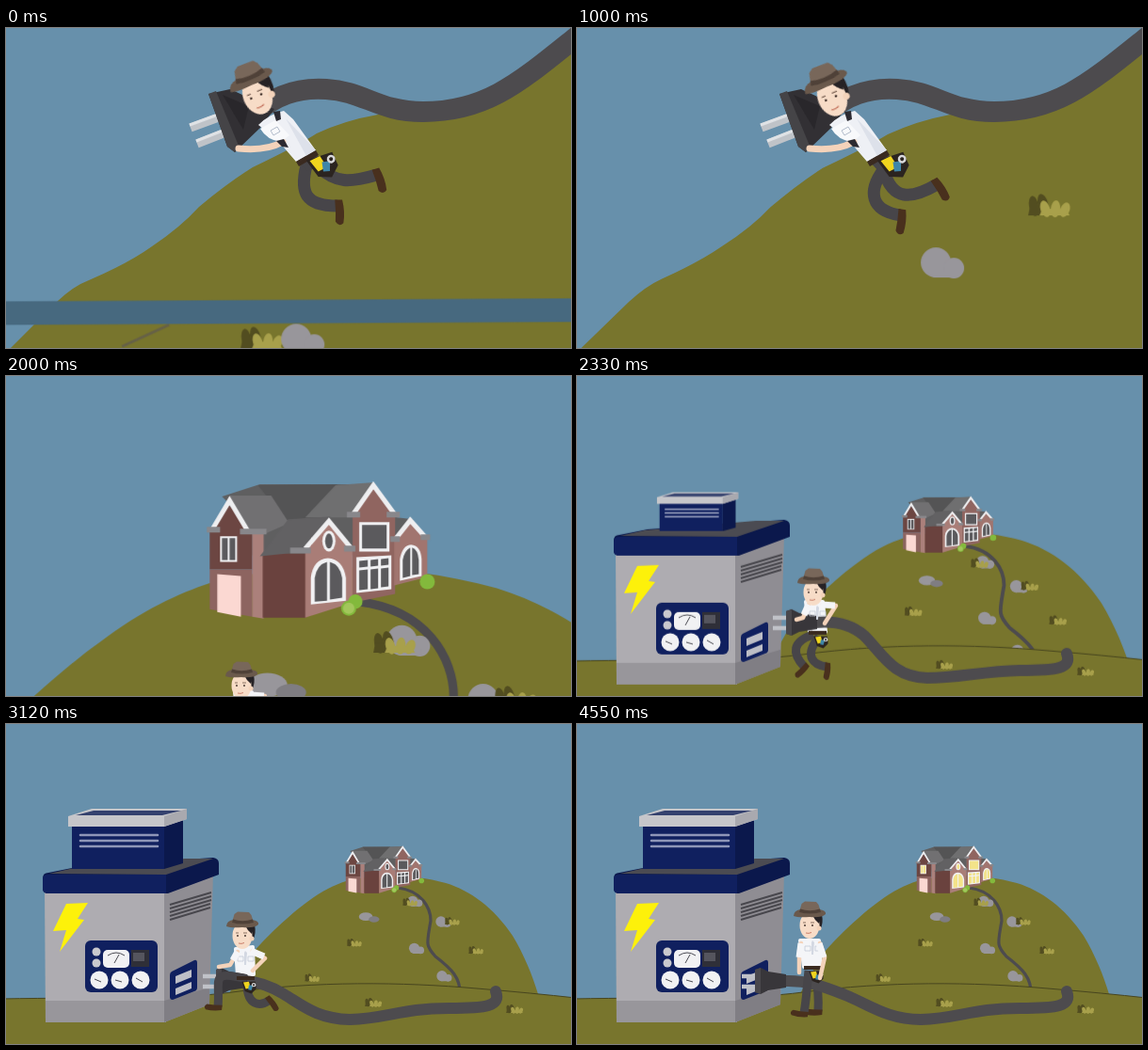
An HTML page for the animation above (4580 ms loop, 600 by 340 pixels).

```html
<!DOCTYPE html>
<html lang="en">
<head>
<meta charset="utf-8">
<title>Plugging in the house</title>
<style>
html, body { margin: 0; width: 100%; height: 100%; overflow: hidden; background: #6790ab; }
svg { display: block; width: 100vw; height: 100vh; }
svg * { animation: 4580ms linear infinite; }

/* scene switch */
.slope { animation-name: slope; animation-timing-function: step-end; }
.yard { animation-name: yard; animation-timing-function: step-end; }
@keyframes slope { 0% { visibility: visible } 38.43%, 100% { visibility: hidden } }
@keyframes yard { 0% { visibility: hidden } 38.43%, 100% { visibility: visible } }

/* running downhill */
.scroll { animation-name: scroll; }
@keyframes scroll { 0% { transform: none } 38.43%, 100% { transform: translate(2112px, -1162px) } }
.edge { animation-name: edge; }
@keyframes edge {
  0%, 21% { d: path("M5 340L55 290Q72 274 88 268Q130 250 155 232Q185 212 205 190Q235 165 262 148Q310 125 330 112Q360 98 395 92Q450 88 500 74Q545 58 610 10V340Z") }
  12.66% { d: path("M0 340L40 305Q65 282 90 267Q140 238 165 224Q195 208 210 193Q235 170 250 157Q290 138 325 120Q365 101 395 92Q450 88 500 74Q545 58 610 10V340Z") }
  31%, 100% { d: path("M0 340L55 302Q88 275 108 253Q130 235 150 227Q190 212 208 197Q232 172 250 157Q290 141 330 124Q365 108 395 95Q470 74 505 57Q530 43 610 8V340Z") }
}
.bob { animation-name: bob; }
@keyframes bob {
  0%, 9.5%, 15.72%, 24.89%, 34.17% { transform: translate(-2px, -3px) }
  3.17%, 12.66%, 18.78%, 27.95%, 37.34% { transform: none }
  6.33%, 21.83%, 31% { transform: translate(2px, -1px) }
}
.near { animation-name: near; }
@keyframes near {
  0%, 9.5%, 15.72%, 24.89%, 34.17% { d: path("M319 146C312 175 318 189 352 189") }
  3.17%, 12.66%, 18.78%, 27.95%, 37.34% { d: path("M322 146C290 155 282 180 330 183") }
  6.33%, 21.83%, 31% { d: path("M326 150C308 174 312 194 343 199") }
}
.far { animation-name: far; }
@keyframes far {
  0%, 9.5%, 15.72%, 24.89%, 34.17% { d: path("M333 148C350 165 365 164 393 156") }
  3.17%, 12.66%, 18.78%, 27.95%, 37.34% { d: path("M332 148C345 182 355 182 386 181") }
  6.33%, 21.83%, 31% { d: path("M326 152C335 184 355 182 381 167") }
}

/* camera pulls back */
.zoom { animation-name: zoom; }
.front { animation-name: front; }
@keyframes zoom {
  0%, 39.61% { transform: translate(326px, 188px) scale(3.03); animation-timing-function: cubic-bezier(.65, 0, .35, 1) }
  55.26%, 100% { transform: translate(401px, 155px) scale(1) }
}
@keyframes front {
  0%, 39.61% { transform: translate(0, 116px); animation-timing-function: cubic-bezier(.65, 0, .35, 1) }
  55.26%, 100% { transform: translate(0, 0) }
}
.gen { animation-name: gen; }
@keyframes gen {
  0%, 44.3% { transform: translate(0, 230px); animation-timing-function: ease-out }
  50%, 100% { transform: translate(0, 0) }
}
.top { transform-origin: 126px 154px; animation-name: top; }
@keyframes top {
  0%, 48% { transform: scale(.3, .1) }
  50.87% { transform: scale(.68, .64) }
  53% { transform: scale(1.06, 1.08) }
  54.6%, 100% { transform: scale(1) }
}
.lit { fill: #5b5a5d; animation-name: lit; animation-timing-function: step-end; }
@keyframes lit { 0% { fill: #5b5a5d } 85.2%, 100% { fill: #f3e389 } }

/* plugging in */
.plug { animation-name: plug; }
@keyframes plug {
  0%, 52% { transform: translate(222px, 251px) }
  62%, 72% { transform: translate(223px, 273px) }
  79%, 100% { transform: translate(189px, 273px) }
}
.cable { animation-name: cable; }
@keyframes cable {
  0%, 52% { d: path("M254 251C275 249 292 254 305 265C325 285 335 309 372 310C405 310 430 303 470 302C510 302 526 300 520 284") }
  62%, 72% { d: path("M254 273C270 274 282 279 295 287C315 299 330 313 365 314C405 313 420 302 470 302C510 302 526 300 520 284") }
  79%, 100% { d: path("M220 273C245 272 262 279 285 288C310 298 330 314 365 314C405 313 420 302 470 302C510 302 526 300 520 284") }
}
.face { animation-name: face; }
@keyframes face {
  0%, 43.67%, 47.27% { transform: translate(250px, 222px) }
  50.87%, 55% { transform: translate(251px, 219px) }
  62%, 72% { transform: translate(251px, 225px) }
  84%, 100% { transform: translate(247px, 214px) }
}
.shirt { animation-name: shirt; }
@keyframes shirt {
  0%, 55% { d: path("M243 229L261 229L264 261L247 261Z") }
  62%, 72% { d: path("M244 239L262 237L263 266L246 267Z") }
  84%, 100% { d: path("M237 230L257 230L259 258L241 258Z") }
}
.tools { animation-name: tools; }
@keyframes tools {
  0%, 55% { transform: translate(257px, 268px) }
  62%, 72% { transform: translate(256px, 276px) }
  84%, 100% { transform: translate(252px, 265px) }
}
.arm1 { animation-name: arm1; }
@keyframes arm1 {
  0%, 55% { d: path("M261 232L275 233L263 252") }
  62%, 72% { d: path("M262 241L275 249L262 262") }
  84%, 100% { d: path("M258 233L263 248L258 270") }
}
.sleeve1 { animation-name: sleeve1; }
@keyframes sleeve1 {
  0%, 55% { d: path("M259 232L274 233") }
  62%, 72% { d: path("M260 241L274 247") }
  84%, 100% { d: path("M257 233L262 248") }
}
.arm2 { animation-name: arm2; }
@keyframes arm2 {
  0%, 55% { d: path("M246 232L240 246L233 248") }
  62%, 72% { d: path("M246 242L238 256L226 258") }
  84%, 100% { d: path("M238 233L236 248L236 264") }
}
.sleeve2 { animation-name: sleeve2; }
@keyframes sleeve2 {
  0%, 55% { d: path("M246 232L241 243") }
  62%, 72% { d: path("M246 242L241 251") }
  84%, 100% { d: path("M238 233L236 248") }
}
.leg1 { animation-name: leg1; }
@keyframes leg1 {
  0%, 39.6%, 47.27%, 54% { d: path("M251 264C250 284 256 292 264 296") }
  43.67%, 50.87%, 57% { d: path("M251 264C228 271 228 284 241 298") }
  62%, 72% { d: path("M256 271C215 261 228 272 225 300") }
  77% { d: path("M254 268C205 258 212 275 214 296") }
  84%, 100% { d: path("M246 262C244 280 244 290 241 307") }
}
.leg2 { animation-name: leg2; }
@keyframes leg2 {
  0%, 39.6%, 47.27%, 54% { d: path("M256 266C236 270 232 286 240 300") }
  43.67%, 50.87%, 57% { d: path("M257 266C240 288 252 296 265 298") }
  62%, 72% { d: path("M256 276C256 300 270 300 279 294") }
  84%, 100% { d: path("M253 262C256 280 257 290 256 305") }
}

.pants { fill: none; stroke: #474549; stroke-width: 13; marker-end: url(#shoe); }
.small .pants { stroke-width: 9; }
.skin { fill: none; stroke: #f4d3ba; stroke-linecap: round; stroke-linejoin: round; }
.cord { fill: none; stroke: #4d4b4e; stroke-linecap: round; }
.trim { fill: none; stroke: #eeeef0; }
.white { fill: #f1f1f3; }
.navy { fill: #10205f; }
.grey { fill: #98969b; }
</style>
</head>
<body>
<svg viewBox="0 0 600 340" preserveAspectRatio="none">
<defs>
  <marker id="shoe" orient="auto" overflow="visible" markerWidth="1" markerHeight="1">
    <path d="M-.2-.5H.4Q.65.5.5 1.4Q.15 1.75-.15 1.3Q-.1.5-.2-.5Z" fill="#49301d"/>
  </marker>
  <g id="bush">
    <g fill="#524d20">
      <ellipse cx="-16" cy="-10" rx="5" ry="11" transform="rotate(-10 -16 -10)"/>
      <ellipse cx="-6" cy="-11" rx="5.5" ry="12" transform="rotate(-14 -6 -11)"/>
      <path d="M-22 0L-20-10H-4V0Z"/>
    </g>
    <g fill="#a8a04b">
      <ellipse cx="-4" cy="-7" rx="5" ry="9" transform="rotate(-16 -4 -7)"/>
      <ellipse cx="7" cy="-7" rx="5" ry="9" transform="rotate(6 7 -7)"/>
      <ellipse cx="17" cy="-6" rx="5" ry="8" transform="rotate(22 17 -6)"/>
      <path d="M-10 0L-7-7H18L22 0Z"/>
    </g>
  </g>
  <g id="rock" class="grey">
    <circle r="16"/><circle cx="19" cy="6" r="11"/><path d="M-10 10H20V16H-2Z"/>
  </g>
  <g id="stones">
    <ellipse rx="21" ry="12.5" fill="#98969b"/><ellipse cx="25" cy="8" rx="16" ry="9" fill="#7f7d82"/>
  </g>
  <g id="head">
    <path d="M-2-12H13Q15-2 11 5L5 3Z" fill="#262225"/>
    <ellipse rx="10.5" ry="14" fill="#f7dcc7"/>
    <circle cx="10" cy="3" r="2.5" fill="#f4d3ba"/>
    <path d="M-4-12H12L10-2Q5-6 3-11Z" fill="#262225"/>
    <g fill="#3b2b25"><circle cx="-5" r=".9"/><circle cx="3" r=".9"/></g>
    <path d="M-7-3h3M1-3h4" stroke="#5a4034" stroke-width=".7"/>
    <path d="M-4 8Q-1 9 2 7.5" fill="none" stroke="#c5745f" stroke-width=".9"/>
    <path d="M-17-10Q-17-16-9-17H10Q18-16 17-12Q13-8 0-9Q-12-8-17-10Z" fill="#6a594c"/>
    <path d="M-11-14L-8.5-23L-5-25.5L7-25L9.5-22L12-14Q0-11-11-14Z" fill="#78675a"/>
    <path d="M-11-14L-10-17.5Q0-14 11-17.5L12-14Q0-11-11-14Z" fill="#4f4138"/>
  </g>
  <g id="kit">
    <path d="M-9-5L8-5L9 4L3 10L-5 7Z" fill="#2b2420"/>
    <path d="M-7-4L0-5L2 3L-4 4Z" fill="#f0d51e"/>
    <path d="M0-1L5 0L3 6L-1 5Z" fill="#3f86a8"/>
    <circle cx="6" cy="-1" r="2.6" fill="#d8d8da"/><circle cx="6" cy="-1" r="1.2" fill="#2b2420"/>
  </g>
</defs>

<rect width="600" height="340" fill="#6790ab"/>

<g class="slope">
  <path class="edge" fill="#78752d"/>
  <g class="scroll">
    <path d="M122 339L172 316" stroke="#666147" stroke-width="3"/>
    <path d="M-1000 296L1000 286V311L-1000 321Z" fill="#47697f"/>
    <use href="#bush" x="270" y="341"/><use href="#rock" x="307" y="331"/>
    <use href="#bush" x="82" y="431"/><use href="#stones" x="-48" y="491"/>
    <use href="#bush" x="-206" y="602"/><use href="#rock" x="-169" y="589"/>
    <use href="#stones" x="-334" y="644"/><use href="#bush" x="-400" y="741"/>
    <use href="#bush" x="-700" y="860"/><use href="#rock" x="-820" y="910"/>
    <use href="#rock" x="-1100" y="1019"/>
    <use href="#bush" transform="translate(-1164 1123) scale(-1.1 1.15)"/>
    <use href="#bush" x="-1379" y="1237"/><use href="#rock" x="-1340" y="1224"/>
    <use href="#stones" x="-1505" y="1279"/><use href="#stones" x="-1232" y="1289"/>
    <path d="M-1460 1078L-1360 1165" stroke="#55534f" stroke-width="1.8"/>
    <path d="M-1415 1117L-1327 1190" stroke="#e6e6df" stroke-width="1.8" stroke-dasharray="5 11"/>
    <use href="#bush" x="-1580" y="1349"/>
  </g>
  <path class="cord" stroke-width="22" d="M262 93C285 71 310 63 340 65C380 67 395 89 443 89C510 89 545 58 606 9"/>
  <path class="pants far"/>
  <path class="pants near"/>
  <path d="M309 140L328 130L336 146L320 152Z" fill="#474549"/>
  <g stroke="#bfc3c8" stroke-width="9"><path d="M196 106L226 95M203 123L231 112"/></g>
  <g stroke="#dfe2e5" stroke-width="3"><path d="M195 103L225 92M202 120L230 109"/></g>
  <path d="M215 70L238 65L262 76L285 86L270 106L243 132L235 126Z" fill="#323034"/>
  <path d="M215 70L223 67L247 125L243 132L235 126Z" fill="#454447"/>
  <path d="M230 71L258 83L252 108Z" fill="#29272b"/>
  <path d="M268 103Q280 91 295 88L305 97L329 130L308 142L290 121Z" fill="#eef0f5"/>
  <path d="M297 96L329 130L319 136Z" fill="#dde1ea"/>
  <path class="skin" d="M294 121Q276 131 247 128" stroke-width="7"/>
  <path d="M270 107Q277 119 292 121L301 114L286 98Z" fill="#f8f9fb"/>
  <path d="M287 120L295 118L300 127L293 126Z M284 89L291 88L292 97L287 99Z" fill="#2c2a31"/>
  <path d="M281 109l7-4 3 5-7 4z" fill="none" stroke="#b3bccb"/>
  <path d="M308 142L329 130L332 135L311 147Z" fill="#3a2a20"/>
  <g transform="translate(336 144) rotate(-18) scale(1.7)"><use href="#kit"/></g>
  <g class="bob"><use href="#head" transform="translate(269 75) rotate(-23) scale(1.45)"/></g>
</g>

<g class="yard">
  <g class="zoom">
    <path d="M-180 160L-142 92C-128 74-98 46-81 34C-65 22-52 16-40 12C-10 4 30 4 66 14C92 22 117 40 137 70C149 90 158 112 164 132V160Z" fill="#78752d"/>
    <path class="cord" stroke-width="3.2" d="M15 19C40 22 50 40 50 54C46 78 44 80 55 92C72 105 82 115 81 132"/>
    <g transform="scale(.35)">
      <use href="#stones" x="-54" y="142"/><use href="#rock" x="88" y="95"/>
      <use href="#rock" x="174" y="157"/><use href="#rock" x="93" y="238"/><use href="#rock" x="177" y="322"/>
      <use href="#bush" x="80" y="108"/><use href="#bush" x="208" y="166"/><use href="#bush" x="-89" y="231"/>
      <use href="#bush" x="280" y="254"/><use href="#bush" x="-217" y="338"/>
    </g>
    <g transform="scale(.35) translate(-332 -185)">
      <path d="M230 128L270 115H392L415 150L432 152V190H262V160Z" fill="#5f5f60"/>
      <path d="M268 116L352 115L334 150L297 153Z" fill="#545455"/>
      <path d="M238 127H282L301 156L274 168H258Z" fill="#717072"/>
      <path d="M350 116L391 113L370 150H318Z" fill="#6f6f70"/>
      <path d="M237 136L262 166V205H217V166Z" fill="#6c4642"/>
      <path d="M217 205H262V255L217 247Z" fill="#8d6460"/>
      <path d="M225 210L250 212V255L225 250Z" fill="#fbd8d2"/>
      <path d="M262 167L274 164V257L262 255Z" fill="#ab807b"/>
      <path d="M273 188H319V256H273Z" fill="#6a423e"/>
      <path d="M300 152L345 149L319 186L270 191Z" fill="#626163"/>
      <path d="M390 116L413 146V231L368 240V146Z" fill="#906560"/>
      <path d="M429 152L447 172V213L412 222V174Z" fill="#a1756f"/>
      <path d="M343 152L368 182V240L318 256V186Z" fill="#a97d77"/>
      <path class="trim" stroke-width="5" d="M219 164L238 132L257 164M318 183L343 154L366 182M369 146L390 116L412 146M414 172L429 153L446 172"/>
      <path d="M214 160h14v6h-14zM249 162h28v6h-28zM302 182h22v6h-22zM359 180h12v6h-12zM362 144h14v6h-14zM404 144h14v6h-14zM408 170h10v6h-10zM440 168h10v6h-10z" fill="#88878b"/>
      <path class="white" d="M228 170h18v27h-18zM375 155h32v31h-32zM372 192l37-2v36l-37 4z"/>
      <path class="white" d="M324 242V214Q326 194 342 193Q358 194 361 214V238ZM418 217V194Q421 179 430 179Q440 180 441 194V212Z"/>
      <ellipse class="white" cx="343" cy="175" rx="7" ry="11"/>
      <ellipse class="lit" cx="343" cy="175" rx="4" ry="8"/>
      <path class="lit" d="M230 172h6v23h-6zM238 172h6v23h-6zM378 158h26v25h-26zM375 196l9-1v7l-9 1zM387 195l8-1v7l-8 1zM398 194l8-1v7l-8 1zM375 206l9-1v21l-9 1zM387 205l8-1v21l-8 1zM398 204l8-1v20l-8 1z"/>
      <path class="lit" d="M328 239V214Q330 200 341 197V238ZM344 237V197Q355 200 357 214V235ZM421 214V195Q423 185 429 182V212ZM431 211V182Q437 184 438 195V210Z"/>
      <g fill="#83b93c"><circle cx="364" cy="246" r="8"/><circle cx="371" cy="239" r="7.5"/><circle cx="447" cy="218" r="8"/></g>
      <circle cx="364" cy="246" r="6" fill="#a3c65c"/>
    </g>
  </g>

  <g class="front">
    <path d="M-5 292C100 290 180 293 240 285C330 273 420 274 500 281Q560 286 605 291V470H-5Z" fill="#78752d" stroke="#47451f"/>
    <use href="#bush" transform="translate(390 300) scale(.4)"/>
    <use href="#bush" transform="translate(540 307) scale(.4)"/>
    <g class="gen">
      <path d="M41 175H170V317H42Z" fill="#aeacb1"/>
      <path d="M168 175L220 158L216 298L168 317Z" fill="#8f8d93"/>
      <path d="M42 294H168V317H42Z" fill="#98969b"/>
      <path d="M168 294L216 280V298L168 317Z" fill="#807e84"/>
      <path d="M174 192L218 179M174 196L218 183M174 200L218 187M174 204L217 191M174 208L217 195" stroke="#48474d" stroke-width="2"/>
      <path d="M45 158L75 152L220 142Q226 143 226 148V160L172 180H45Q39 180 39 175V164Q39 158 45 158Z" fill="#0b184c"/>
      <path class="navy" d="M45 160H170V180H45Q39 180 39 175V165Q39 160 45 160Z"/>
      <path d="M46 159L72 153L190 143H220L170 160Z" fill="#4b4b52"/>
      <g class="top">
        <path class="navy" d="M70 104H168V154H70Z"/>
        <path d="M168 104L188 98V148L168 154Z" fill="#0b184c"/>
        <path d="M66 98L91 90H192V101L168 109H66Z" fill="#c6c6ca"/>
        <path d="M168 98L192 90V101L168 109Z" fill="#a9a9af"/>
        <path d="M74 97L93 92H186L166 97Z" fill="#34416e"/>
        <path d="M79 118H161M79 124H161M79 130H161" stroke="#8e96b8" stroke-width="2.6" stroke-linecap="round"/>
      </g>
      <path d="M64 191L87 190L76 207L83 208L57 242L64 219L50 220Z" fill="#fdf10a"/>
      <rect class="navy" x="84" y="230" width="77" height="55" rx="6"/>
      <g fill="#c9c9ce"><circle cx="96" cy="242" r="4.5"/><circle cx="96" cy="254" r="4.5"/></g>
      <rect class="white" x="103" y="240" width="28" height="19" rx="5"/>
      <path d="M133 240h19v18h-19z" fill="#2f2f38"/>
      <path d="M135 243h12v9h-12z" fill="#55555e"/>
      <g class="white"><circle cx="99" cy="272" r="9.5"/><circle cx="121" cy="272" r="9.5"/><circle cx="143" cy="272" r="9.5"/></g>
      <path d="M108 246Q117 240 126 246M115 254L120 245M94 271L101 274M116 272L123 274M138 270L145 274" fill="none" stroke="#4a4a52"/>
      <path class="navy" d="M176 263L200 251Q203 250 203 254V280Q203 283 200 284L177 293Q174 293 174 290V267Q174 264 176 263Z"/>
      <path d="M180 268L197 261V269L180 276ZM180 281L197 274V281L180 288Z" fill="#bdbec6"/>
    </g>
    <g class="small">
      <path class="pants leg2"/>
      <path class="shirt" fill="#f4f5f8" stroke="#f4f5f8" stroke-width="4" stroke-linejoin="round"/>
      <path class="cord cable" stroke-width="12"/>
      <g class="plug">
        <path d="M-14-5H1M-14 6H1" stroke="#c0c2c8" stroke-width="4.5"/>
        <path d="M0-12L6-14L14-10L33-7V7L14 10L6 14L0 12Z" fill="#38363a"/>
        <path d="M0-12L6-14V14L0 12Z" fill="#4a484c"/>
      </g>
      <path class="pants leg1"/>
      <g class="tools">
        <path d="M-11-8H8V-4H-11Z" fill="#3a2a20"/>
        <use href="#kit" transform="translate(2 2) scale(.85)"/>
        <path d="M-10-29h6v5h-6zM1-29h6v5h-6z" fill="none" stroke="#c3cad6" stroke-width=".8"/>
        <path d="M-2-35L0-33L-1-20L-3-20L-3-33Z" fill="#d3d8e2"/>
      </g>
      <path class="skin arm2" stroke-width="4.5"/>
      <path class="skin arm1" stroke-width="4.5"/>
      <g fill="none" stroke="#f4f5f8" stroke-width="7"><path class="sleeve2"/><path class="sleeve1"/></g>
      <g class="face"><use href="#head"/></g>
    </g>
  </g>
</g>
</svg>
</body>
</html>
```
